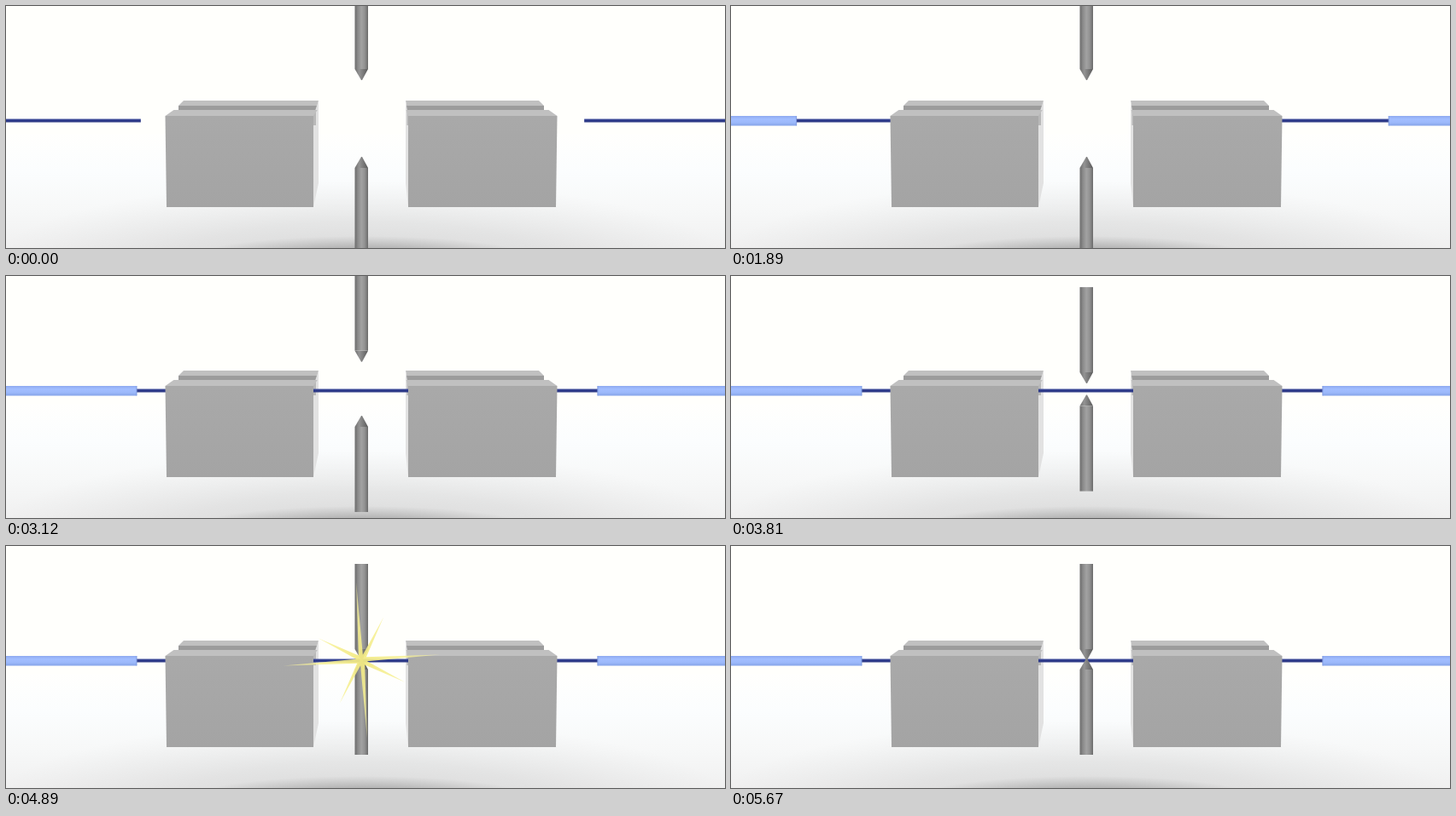
These frames come from a looping animation (842 px wide and 284 px high, 6.24 s). An HTML page with a canvas:

```html
<!DOCTYPE html>
<html lang="en">
<head>
<meta charset="utf-8">
<title>Fibre splicing</title>
<style>
html, body { margin: 0; width: 100%; height: 100%; overflow: hidden; background: #fffffc; }
canvas { display: block; }
</style>
</head>
<body>
<canvas id="stage" width="842" height="284"></canvas>
<script>
const W = 842, H = 284, LOOP = 6240;
const MID = { x: 416.5, y: 134 };
const ctx = document.getElementById('stage').getContext('2d');

const progress = (t, from, to) => Math.min(1, Math.max(0, (t - from) / (to - from)));
const smooth = (t, from, to) => {
  const p = progress(t, from, to);
  return p * p * (3 - 2 * p);
};

// Spread colours evenly over a gradient.
function blend(gradient, colors) {
  colors.forEach((color, i) => gradient.addColorStop(i / (colors.length - 1), color));
  return gradient;
}
const across = (x0, x1, ...colors) => blend(ctx.createLinearGradient(x0, 0, x1, 0), colors);
const down = (y0, y1, ...colors) => blend(ctx.createLinearGradient(0, y0, 0, y1), colors);
const radial = (x, y, r, ...colors) => blend(ctx.createRadialGradient(x, y, 0, x, y, r), colors);

function poly(fill, ...points) {
  ctx.fillStyle = fill;
  ctx.beginPath();
  points.forEach(([x, y]) => ctx.lineTo(x, y));
  ctx.fill();
}

function rect(fill, x0, y0, x1, y1) {
  ctx.fillStyle = fill;
  ctx.fillRect(x0, y0, x1 - x0, y1 - y0);
}

function shadow(y, rx, ry, ...colors) {
  ctx.save();
  ctx.translate(MID.x, y);
  ctx.scale(rx, ry);
  rect(radial(0, 0, 1, ...colors), -1, -1, 1, 1);
  ctx.restore();
}

function drawFloor() {
  rect('#fffffc', 0, 0, W, H);
  rect(down(150, H, '#fffffd', '#fbfdfe', '#f7f8f8', '#f0f0f0'), 0, 150, W, H);
  shadow(300, 430, 95, 'rgba(130,130,130,.22)', 'rgba(140,140,140,.15)', 'rgba(160,160,160,0)');
  shadow(296, 200, 26, 'rgba(100,100,100,.5)', 'rgba(105,105,105,.32)', 'rgba(120,120,120,0)');
}

// dir is 1 when the inner side faces right, -1 when it faces left.
const BLOCKS = [
  { outer: 186.5, inner: 360, dir: 1, depth: 6 },
  { outer: 645.5, inner: 471, dir: -1, depth: 3 },
];
const TOP = '#c0c0c0';

function drawBlockBack({ outer, inner, dir, depth }) {
  const back = inner + dir * depth, edge = outer + dir * 15.5;
  rect('#9c9c9c', edge, 117, back - dir, 124);
  poly(TOP, [edge, 117], [edge + dir * 6, 111], [back, 111], [back - dir, 117]);
  poly('#e2e2e2', [inner, 129], [back, 111], [back, 208], [inner, 236]);
  rect('#b8b8b8', inner, 124, inner + dir * depth / 2, 140);
}

function drawBlockFront({ outer, inner, dir, depth }) {
  poly(TOP, [outer, 129], [outer + dir * 10, 122], [inner + dir * depth * .8, 122], [inner, 129]);
  poly(down(129, 236, '#a9a9a9', '#a4a4a4'),
    [outer, 129], [inner, 129], [inner, 236], [outer + dir * 1.5, 236]);
}

function drawFibre(tip, coatEnd, wall) {
  rect(down(132.5, 136.5, '#46539f', '#2b3888', '#333f86'), wall, 132.5, tip, 136.5);
  if (coatEnd < 0 || coatEnd > W) return;
  rect(down(129, 140.5, '#8faaf0', '#a2beff', '#9cb9fb', '#86a4e8'), wall, 129, coatEnd, 140.5);
  rect('#7f9be0', coatEnd - .5, 129, coatEnd + .5, 140.5);
}

function drawFibres(t) {
  const travel = 264 * smooth(t, -300, 3100) - 6;
  drawFibre(158 + travel, travel - 105, 0);
  drawFibre(677 - travel * 1.012, 954 - travel * 1.012, W);
}

function drawElectrode(tip, dir) {
  const left = 408.5, right = 424, neck = tip + dir * 13, end = tip + dir * 113;
  rect(across(left, right, '#6c6c6c', '#8c8c8c', '#a2a2a2', '#929292', '#6a6a6a'), left, neck, right, end);
  poly(across(left, right, '#6e6e6e', '#939393', '#777', '#5a5a5a'),
    [left, neck], [MID.x - .5, tip], [MID.x + .5, tip], [right, neck]);
}

function drawElectrodes(t) {
  const closing = smooth(t, 2480, 4280);
  drawElectrode(87 + 47 * closing, -1);
  drawElectrode(177 - 45 * closing, 1);
}

// Long rays peak early, the short ones between them follow later.
function drawSpark(t) {
  const p = progress(t, 3930, 5650);
  if (p === 0 || p === 1) return;
  const long = 106 * Math.sin(Math.PI * p ** .65) ** .8;
  const short = 58 * Math.sin(Math.PI * p) ** 1.2;
  const hub = Math.min(6.5, long / 8);
  const polar = (deg, r) => {
    const a = deg * Math.PI / 180;
    return [MID.x + r * Math.cos(a), MID.y + r * Math.sin(a)];
  };
  const points = [];
  for (let deg = -94; deg < 266; deg += 90)
    points.push(polar(deg, long), polar(deg + 16, hub), polar(deg + 31, short), polar(deg + 60, hub));
  const r = Math.max(long, short);
  poly(radial(MID.x, MID.y, r, 'rgba(242,233,130,.95)', 'rgba(247,241,150,.85)', 'rgba(248,242,160,.55)'), ...points);
}

function frame(now) {
  const t = now % LOOP;
  drawFloor();
  BLOCKS.forEach(drawBlockBack);
  drawFibres(t);
  BLOCKS.forEach(drawBlockFront);
  drawElectrodes(t);
  drawSpark(t);
  requestAnimationFrame(frame);
}
requestAnimationFrame(frame);
</script>
</body>
</html>
```
